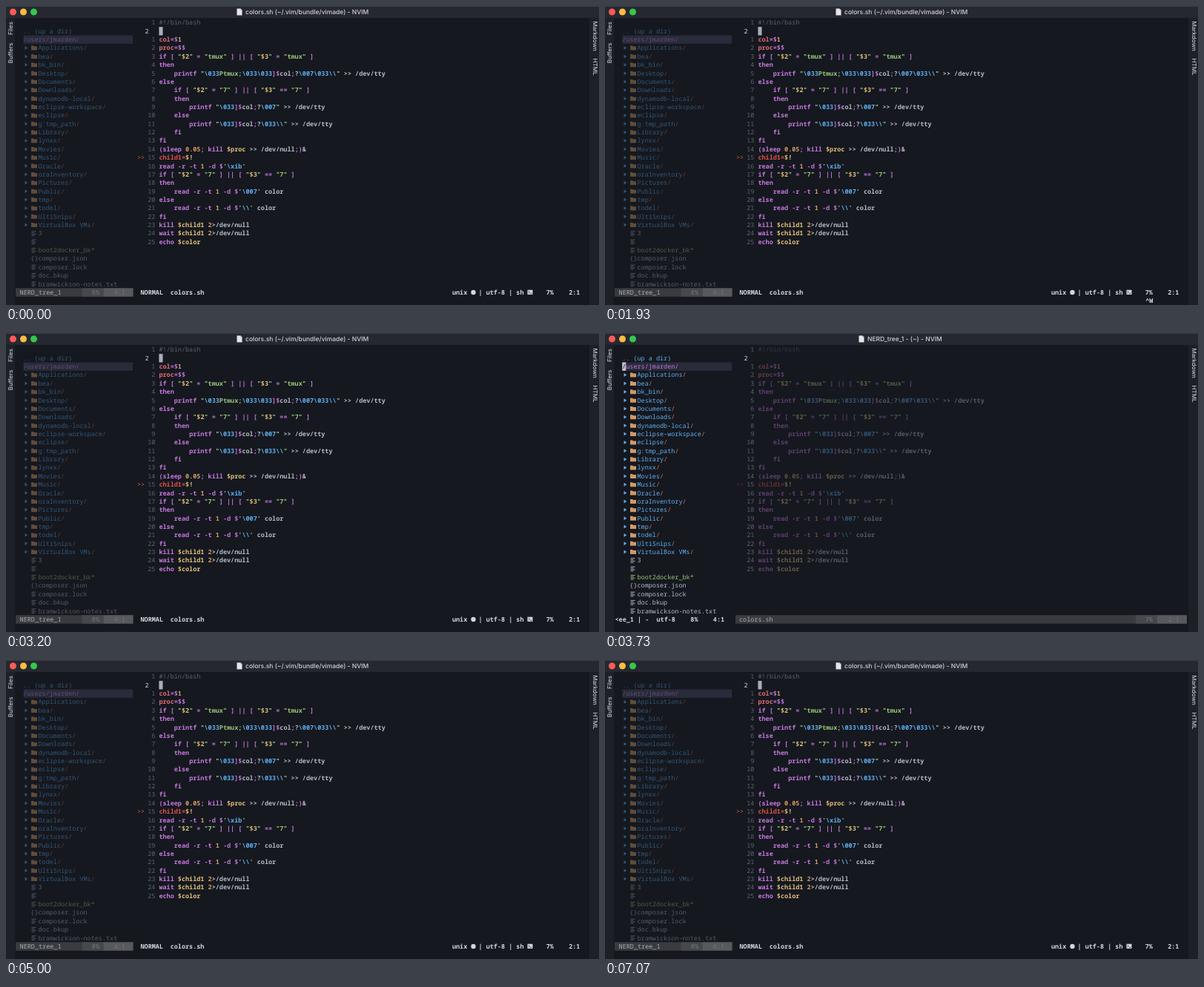
An HTML page for the animation above (7140 ms loop, 800 by 403 pixels).

```html
<!DOCTYPE html>
<html lang="en">
<head>
<meta charset="utf-8">
<title>Editor window focus</title>
<style>
  html, body { margin: 0; width: 100%; height: 100%; overflow: hidden; background: #15181f; }
  svg { display: block; width: 800px; height: 403px; text-rendering: geometricPrecision; }
  text { white-space: pre; }
  .mono { font: 500 8.483px "Noto Sans Mono", "DejaVu Sans Mono", monospace; }
  .semi { font-weight: 600; }
  .bold { font-weight: bold; }
  .ui { font: 500 8.5px Inter, Roboto, sans-serif; fill: #d2d3d6; }
  .side { font-size: 8px; fill: #c3c6cd; text-anchor: middle; }
</style>
</head>
<body>
<svg id="stage" viewBox="0 0 800 403" xmlns="http://www.w3.org/2000/svg"></svg>
<script>
const NS = 'http://www.w3.org/2000/svg';
const stage = document.getElementById('stage');
const CELL = 5.09, ROW = 11.36, LEFT = 13, TOP = 16.8;
const C = {
  bg: '#15181f', fg: '#b4bac5', bright: '#d3d6dc', grey: '#5c6370',
  blue: '#61afef', purple: '#c678dd', yellow: '#e5c07b',
  orange: '#d19a66', red: '#e0524a', pink: '#e06c75', green: '#98c379'
};

function add(parent, tag, attrs, content) {
  const el = document.createElementNS(NS, tag);
  for (const key in attrs) el.setAttribute(key, attrs[key]);
  if (content !== undefined) el.textContent = content;
  parent.appendChild(el);
  return el;
}
const group = () => add(stage, 'g', {});
const rect = (p, x, y, width, height, fill) => add(p, 'rect', { x, y, width, height, fill });
const path = (p, d, fill) => add(p, 'path', { d, fill });
const colX = col => LEFT + col * CELL;
const rowY = row => TOP + row * ROW;
const put = (p, row, col, str, fill, cls = '') =>
  add(p, 'text', { x: colX(col), y: rowY(row) + 8.6, fill, class: 'mono ' + cls }, str);

// Window frame
rect(stage, 0, 0, 800, 403, '#1e2028');
rect(stage, 0, 0, 800, 16, '#262831');
rect(stage, 0, 0, 800, 1, '#3b3d46');
rect(stage, 12, 16, 775, 387, C.bg);
['#fc5b57', '#fdbc40', '#34c84a'].forEach((fill, i) =>
  add(stage, 'circle', { cx: 9.5 + i * 14, cy: 8, r: 4.5, fill }));

function sideLabel(x, y, turn, str) {
  add(stage, 'text', { class: 'ui side', transform: `translate(${x} ${y}) rotate(${turn})` }, str);
}
sideLabel(8.5, 30, -90, 'Files');
sideLabel(8.5, 63.5, -90, 'Buffers');
sideLabel(791.5, 40.7, 90, 'Markdown');
sideLabel(791.5, 82, 90, 'HTML');

// Window titles
function title(x, str) {
  const g = group();
  add(g, 'text', { x, y: 11.2, class: 'ui' }, str);
  return g;
}
function paper(p, x) {
  const g = add(p, 'g', {});
  path(g, `M${x} 3.5h5l2 2v7h-7z`, '#e6e6e8');
  path(g, `M${x + 5} 3.5v2h2z`, '#9a9ca2');
}
const codeTitle = title(323, 'colors.sh (~/.vim/bundle/vimade) - NVIM');
paper(codeTitle, 311.5);
const treeTitle = title(354, 'NERD_tree_1 - (~) - NVIM');
paper(treeTitle, 342.5);
const bareTitle = title(350, 'NERD_tree_1 - (~) - NVIM');

// File tree
rect(stage, 23.5, rowY(2), 147.5, ROW, '#282b3a');
const tree = group();
put(tree, 1, 2, '.. (up a dir)', C.blue);
put(tree, 2, 2, '/users/jmarden/', C.purple);

const folders = ['Applications', 'bea', 'bk_bin', 'Desktop', 'Documents', 'Downloads',
  'dynamodb-local', 'eclipse-workspace', 'eclipse', 'g:tmp_path', 'Library', 'lynxx',
  'Movies', 'Music', 'Oracle', 'oraInventory', 'Pictures', 'Public', 'tmp', 'todel',
  'UltiSnips', 'VirtualBox VMs'];
folders.forEach((name, i) => {
  const row = i + 3, mid = rowY(row) + ROW / 2;
  path(tree, `M25.5 ${mid - 2.5}l3.8 2.5l-3.8 2.5z`, C.blue);
  path(tree, `M34 ${mid - 3}h3l1 1h4v5h-8z`, C.orange);
  put(tree, row, 6, name, C.blue);
  put(tree, row, 6 + name.length, '/', '#e0704a');
});

const files = ['3', '', 'boot2docker_bk*', 'composer.json', 'composer.lock', 'doc.bkup',
  'bramwickson-notes.txt'];
files.forEach((name, i) => {
  const row = i + 25, mid = rowY(row) + ROW / 2;
  const fill = name.endsWith('*') ? C.green : C.fg;
  if (name.endsWith('.json')) put(tree, row, 4, '{}', fill);
  else [6, 4, 6, 4].forEach((w, n) => rect(tree, 34.5, mid - 3.2 + n * 1.9, w, 0.9, fill));
  put(tree, row, 6, name, fill);
});

// Shell script
const source = String.raw`#!/bin/bash

col=$1
proc=$$
if [ "$2" = "tmux" ] || [ "$3" = "tmux" ]
then
    printf "\033Ptmux;\033\033]$col;?\007\033\\" >> /dev/tty
else
    if [ "$2" = "7" ] || [ "$3" == "7" ]
    then
        printf "\033]$col;?\007" >> /dev/tty
    else
        printf "\033]$col;?\033\\" >> /dev/tty
    fi
fi
(sleep 0.05; kill $proc >> /dev/null;)&
child1=$!
read -r -t 1 -d $'\xib'
if [ "$2" = "7" ] || [ "$3" == "7" ]
then
    read -r -t 1 -d $'\007' color
else
    read -r -t 1 -d $'\\' color
fi
kill $child1 2>/dev/null
wait $child1 2>/dev/null
echo $color`.split('\n');

const rules = [
  [/^#.*/, C.grey],
  [/^child1=/, C.red],
  [/^(col|proc)(?==)/, C.pink],
  [/^\\(\d{3}|x\w+|\\)/, C.blue],
  [/^("\w+"|P?tmux;?|["'])/, C.green],
  [/^\$(\w+|\$|!)/, C.yellow],
  [/^\d+(\.\d+)?/, C.orange],
  [/^(if|then|else|fi|printf|sleep|kill|read|wait|echo|-\w)\b/, C.purple],
  [/^[\[\]|=;()$]+/, C.purple],
  [/^( +|\/dev\/\w+|\w+|.)/, C.fg]
];
const CODE_COL = 38;
const numbers = group();
const code = group();
source.forEach((line, row) => {
  const current = row === 1;
  const label = String(current ? 2 : Math.abs(row - 1));
  put(numbers, row, current ? 34.3 : 37 - label.length, label, current ? C.bright : C.grey);
  for (let at = 0; at < line.length;) {
    const rest = line.slice(at);
    const [rule, fill] = rules.find(([r]) => r.test(rest));
    const token = rest.match(rule)[0];
    if (token.trim()) put(code, row, CODE_COL + at, token, fill, row ? 'semi' : '');
    at += token.length;
  }
});
put(code, 16, 32.2, '>>', C.red);

// Cursors
const codeCursor = group();
rect(codeCursor, colX(CODE_COL), rowY(1), CELL, ROW, '#a9afba');
const treeCursor = group();
rect(treeCursor, colX(2), rowY(2), CELL, ROW, '#c3bfd0');
put(treeCursor, 2, 2, '/', C.bg);

// Status lines
const STATUS = 32;
function statusText(p, fill, cls, items) {
  items.forEach(([col, str]) => put(p, STATUS, col, str, fill, cls));
}
function mutedBar(x, right, name, percent, place) {
  const g = group(), y = rowY(STATUS);
  rect(g, x, y, right - x, ROW, '#393b40');
  rect(g, right - 69, y, 29, ROW, '#46484c');
  rect(g, right - 40, y, 40, ROW, '#57595c');
  statusText(g, '#acaeb2', '', [name]);
  statusText(g, '#747679', '', [percent, place]);
  return g;
}
const treeMuted = mutedBar(13, 171.5, [1.1, 'NERD_tree_1'], [20.2, '8%'], [26.1, '4:1']);
const codeMuted = mutedBar(176, 785, [33, 'colors.sh'], [140.6, '7%'], [146.7, '2:1']);

const treeActive = group();
statusText(treeActive, C.bright, 'bold',
  [[0.1, '<ee_1 | -'], [11.1, 'utf-8'], [20.1, '8%'], [26.1, '4:1']]);

const codeActive = group();
statusText(codeActive, C.bright, 'bold', [[33.1, 'NORMAL'], [41, 'colors.sh'],
  [115.7, 'unix'], [122.7, '| utf-8 | sh'], [140.6, '7%'], [146.6, '2:1']]);
add(codeActive, 'circle', { cx: 630.5, cy: 386, r: 3.2, fill: C.bright });
rect(codeActive, 703.5, 382.7, 7, 6.2, C.bright);
add(codeActive, 'path', { d: 'M704.8 384.2l1.5 1.5l-1.5 1.5M707.2 387.3h2',
  fill: 'none', stroke: C.bg, 'stroke-width': 0.8 });

const command = put(stage, 33, 140.7, '', C.bright, 'bold');

// Start time, focused pane, pending keys
const steps = [
  [0, 'code', ''],
  [1870, 'code', '^W'],
  [2000, 'tree', ''],
  [2670, 'tree', '^W'],
  [2730, 'tree', '^W^L'],
  [2800, 'code', ''],
  [3600, 'code', '^W'],
  [3730, 'tree', ''],
  [4400, 'tree', '^W'],
  [4470, 'tree', '^W^L'],
  [4530, 'code', '']
];
const LOOP = 7140, FADED = 0.4;
const show = (el, on) => el.setAttribute('visibility', on ? 'visible' : 'hidden');
const start = performance.now();

function draw() {
  const t = Math.max(0, performance.now() - start) % LOOP;
  const [, pane, keys] = steps.filter(s => s[0] <= t).pop();
  const inTree = pane === 'tree';
  tree.setAttribute('opacity', inTree ? 1 : FADED);
  code.setAttribute('opacity', inTree ? FADED : 1);
  [treeCursor, treeActive, codeMuted].forEach(el => show(el, inTree));
  [codeCursor, codeActive, treeMuted, codeTitle].forEach(el => show(el, !inTree));
  show(treeTitle, inTree && !keys);
  show(bareTitle, inTree && keys);
  command.textContent = keys;
  requestAnimationFrame(draw);
}
draw();
</script>
</body>
</html>
```
